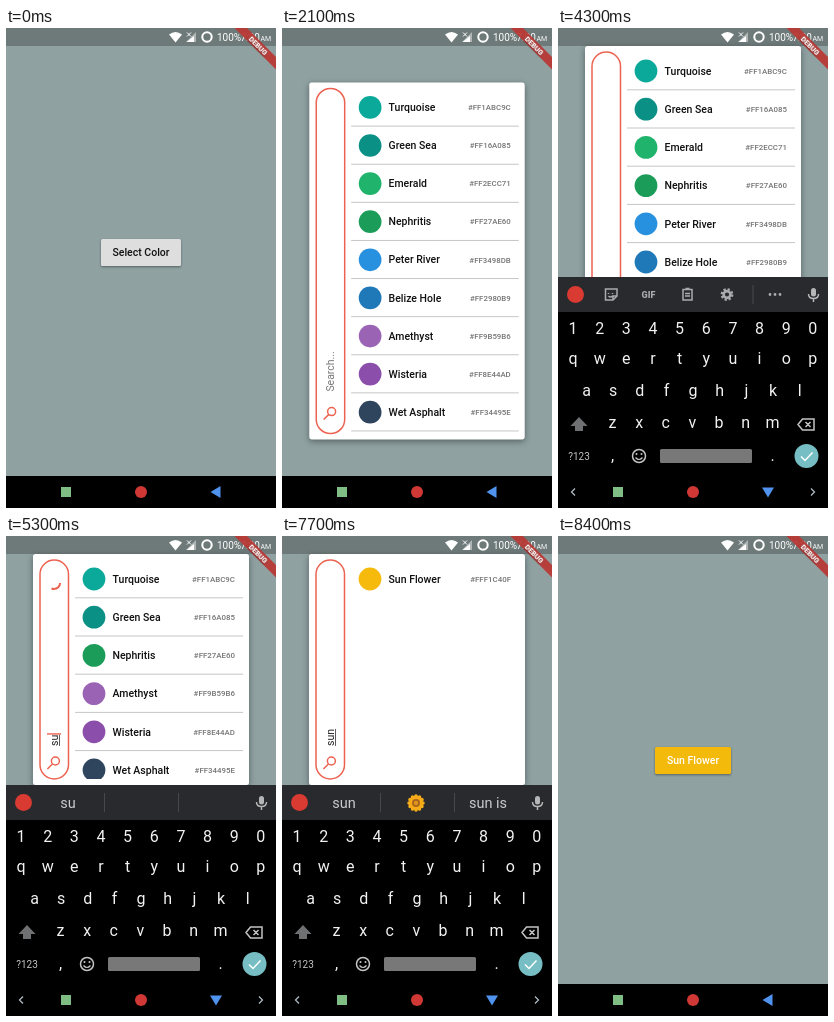
Recreate the animation shown at these times as an HTML page. Size 270x480 px, loop 9100 ms.

```html
<!DOCTYPE html>
<html lang="en">
<head>
<meta charset="utf-8">
<title>Color picker dialog</title>
<style>
  html, body { margin: 0; width: 100%; height: 100%; overflow: hidden; background: #000; }
  svg { display: block; width: 270px; height: 480px; font-family: Roboto, "Noto Sans", sans-serif; }
  .medium { font-weight: 500; }
  .raised { filter: drop-shadow(0 1px 1px rgba(0, 0, 0, .4)); }
  .panel { filter: drop-shadow(0 2px 3px rgba(0, 0, 0, .4)); }
  .line { fill: none; stroke-width: 1.5; }
</style>
</head>
<body>
<svg id="stage" viewBox="0 0 270 480">
  <defs>
    <clipPath id="listClip"><rect id="listBox" x="64" width="177"/></clipPath>
    <clipPath id="buttonClip"><rect x="95" y="-13.5" width="80" height="27" rx="1.5"/></clipPath>
  </defs>
  <rect width="270" height="480" fill="#8fa1a1"/>
  <g id="button"></g>
  <rect width="270" height="18" fill="#6e7a79"/>
  <g id="status" fill="#fff">
    <path d="M163 6.5Q169.5 1.5 176 6.5L169.5 14.5Z"/>
    <path d="M190 4V14H180Z" fill-opacity=".45"/>
    <path d="M188 8V14H180.5Z"/>
    <path d="M181 4.5l4 4m0-4l-4 4" stroke="#fff"/>
    <circle cx="201" cy="9" r="4.7" class="line" stroke="#fff" style="stroke-width:2"/>
    <text x="211" y="13" font-size="10">100%</text>
    <text x="234.5" y="13" font-size="10">7:00</text>
    <text x="254.5" y="13" font-size="7">AM</text>
  </g>
  <g id="dialog">
    <rect id="panel" class="panel" x="27" width="216" rx="2.5" fill="#fff"/>
    <g clip-path="url(#listClip)"><g id="list"></g></g>
    <g id="search"></g>
  </g>
  <g id="keyboard"></g>
  <g id="nav">
    <rect y="448" width="270" height="32"/>
    <rect x="55" y="459" width="10" height="10" fill="#80bd85"/>
    <circle cx="135" cy="464" r="6" fill="#cf3835"/>
    <path id="back" d="M204.5 464L214.5 458V470Z" fill="#4f93ee"/>
    <path id="arrows" d="M17 460.5L13.5 464L17 467.500M253 460.500L256.500 464L253 467.500" fill="none" stroke="#b4c0c8" stroke-width="1.2"/>
  </g>
  <g id="banner">
    <path d="M228.500 0H241L270 29V41.500Z" fill="#b93a37" fill-opacity=".94"/>
    <text class="raised" transform="translate(252.500 17.500) rotate(45)" y="2.600" font-size="7.200" font-weight="900" text-anchor="middle" fill="#fff">DEBUG</text>
  </g>
</svg>
<script>
const LOOP = 9100, STEP = 100;
const RED = '#ec6250';
const COLORS = [
  ['Turquoise', '#FF1ABC9C', '#0ba99a'],
  ['Green Sea', '#FF16A085', '#0a9085'],
  ['Emerald', '#FF2ECC71', '#1fb36b'],
  ['Nephritis', '#FF27AE60', '#1b9c59'],
  ['Peter River', '#FF3498DB', '#2790df'],
  ['Belize Hole', '#FF2980B9', '#1f79b9'],
  ['Amethyst', '#FF9B59B6', '#9b63b4'],
  ['Wisteria', '#FF8E44AD', '#8b4eaa'],
  ['Wet Asphalt', '#FF34495E', '#2f455d'],
  ['Midnight Blue', '#FF2C3E50', '#293b4d'],
  ['Sun Flower', '#FFF1C40F', '#f5ba0c']
];

const $ = id => document.getElementById(id);
const clamp = x => Math.max(0, Math.min(1, x));
const ramp = (t, start, end, from, to) => from + (to - from) * clamp((t - start) / (end - start));
const within = (t, start, end) => t >= start && t < end;
const set = (id, attrs) => Object.entries(attrs).forEach(([k, v]) => $(id).setAttribute(k, v));
const label = (x, y, size, text, extra = '') =>
  `<text x="${x}" y="${y}" font-size="${size}" ${extra}>${text}</text>`;
const centered = (x, y, size, text, extra = '') =>
  label(x, y, size, text, `text-anchor="middle" ${extra}`);

function elasticOut(p) {
  if (p <= 0) return 0;
  if (p >= 1) return 1;
  return 1 + 2 ** (-10 * p) * Math.sin((p - 0.1) * Math.PI * 5);
}

function dialogScale(t) {
  return t < 7400 ? elasticOut((t - 1374) / 1000) : elasticOut((8400 - t) / 1000);
}

const typed = t => 'sun'.slice(0, t < 4800 ? 0 : Math.min(3, 1 + Math.floor((t - 4800) / 400)));

function keyboardShift(t) {
  return t < 6000 ? ramp(t, 3900, 4100, 199, 0) : ramp(t, 8200, 8400, 0, 199);
}

function drawButton(t) {
  const picked = t >= 7400;
  const [text, fill, ink, width] = picked
    ? ['Sun Flower', '#f3b90b', '#fff', 76] : ['Select Color', '#dedede', '#111', 80];
  const ripple = within(t, 600, 900)
    ? `<circle cx="135" r="${ramp(t, 500, 800, 0, 45)}" fill-opacity=".12" clip-path="url(#buttonClip)"/>` : '';
  set('button', { transform: `translate(0 ${224.5 - (199 - keyboardShift(t)) / 2})` });
  $('button').innerHTML =
    `<rect class="raised" x="${135 - width / 2}" y="-13.5" width="${width}" height="27" rx="1.5" fill="${fill}"/>` +
    ripple + centered(135, 3.7, 10.5, text, `class="medium" fill="${ink}"`);
}

function drawList(t, top) {
  const query = typed(t - 300);
  const rows = COLORS.filter(([name]) => name.toLowerCase().includes(query));
  const press = within(t, 7300, 7600)
    ? `<rect x="69" y="${top + 6}" width="168" height="38" fill-opacity=".07"/>` : '';
  $('list').innerHTML = press + rows.map(([name, code, fill], i) => {
    const y = top + 25 + i * 38.2;
    const divider = i < rows.length - 1 ? `<path d="M69 ${y + 18.8}H237" stroke="#c6c6c6"/>` : '';
    return `<circle cx="88" cy="${y}" r="11.4" fill="${fill}"/>` +
      label(106.5, y + 3.7, 10.5, name, 'class="medium" fill="#111"') +
      label(229, y + 2.8, 7.9, code, 'class="medium" fill="#757575" text-anchor="end"') + divider;
  }).join('');
}

function drawSpinner(t, y) {
  const sweep = 190 + 85 * Math.cos((t - 6100) / 220);
  const turn = -40 + (t - 6100) * 0.4;
  return `<circle cx="48" cy="${y}" r="6" fill="none" stroke="${RED}" stroke-width="2" pathLength="360"
    stroke-dasharray="${sweep} 360" transform="rotate(${turn} 48 ${y})"/>`;
}

function drawSearch(t, top, bottom) {
  const start = top + 6, end = bottom - 6, length = end - start;
  const iconY = end - 9.1 - length * 0.0315;
  const textY = end - 17.5 - length * 0.071;
  const query = typed(t);
  const bar = `<rect class="line" x="34" y="${start}" width="28.5" height="${length}" rx="14.2" stroke="${RED}"/>`;
  const icon = `<g transform="translate(47 ${iconY})" class="line" stroke="${RED}">
    <circle cx="2.4" cy="-2" r="4"/><path d="M-.6 1L-5.6 6"/></g>`;
  const text = `<g transform="translate(52 ${textY}) rotate(-90)">` +
    label(0, 0, 10.5, query || 'Search...', `id="query" fill="${query ? '#222' : '#777'}"`) + '</g>';
  const touch = within(t, 2700, 2900)
    ? `<circle cx="49" cy="229" r="8.5" fill-opacity="${t < 2800 ? 0.14 : 0.08}"/>` : '';
  $('search').innerHTML = bar + icon + text + touch +
    (within(t, 5000, 6400) ? drawSpinner(t, top + 29) : '');
  if (!query) return;
  const tip = textY - $('query').getComputedTextLength();
  $('search').innerHTML += `<path d="M53.5 ${textY}V${tip}" stroke="#333" stroke-width=".8"/>` +
    (t < 6800 ? `<path d="M41 ${tip - 0.8}H55" stroke="${RED}" stroke-width="1.4"/>` : '');
}

function drawDialog(t) {
  const scale = dialogScale(t);
  $('dialog').style.display = scale > 0 ? '' : 'none';
  if (scale <= 0) return;
  const closing = t >= 8200;
  const top = closing ? ramp(t, 8200, 8400, 18, 54) : ramp(t, 4200, 4300, 54, 18);
  const bottom = closing ? ramp(t, 8200, 8400, 249, 412)
    : t <= 4300 ? ramp(t, 4200, 4300, 412, 376) : ramp(t, 4300, 4500, 376, 249);
  const cy = (top + bottom) / 2;
  set('dialog', { transform: `translate(135 ${cy}) scale(${scale}) translate(-135 ${-cy})` });
  set('panel', { y: top, height: bottom - top });
  set('listBox', { y: top + 6, height: bottom - top - 12 });
  drawList(t, top);
  drawSearch(t, top, bottom);
}

function buildKeyboard() {
  const row = (letters, x, y) => [...letters].map((c, i) => centered(x + i * 26.65, y, 16, c)).join('');
  const teeth = `<circle cx="169" cy="266.500" r="5.200" fill="none" stroke="#a9abad" stroke-width="2.400" stroke-dasharray="2.200 1.884"/>`;
  const petals = Array.from({ length: 12 }, (_, i) =>
    `<ellipse cx="134" cy="261.500" rx="2" ry="3.200" fill="#f5ac18" transform="rotate(${i * 30} 134 267)"/>`).join('');
  $('keyboard').innerHTML = `
    <rect y="249" width="270" height="199"/>
    <rect y="249" width="270" height="35" fill="#292a2d"/>
    <circle cx="17.500" cy="266.500" r="8.500" fill="#d93a32"/>
    <g id="tools" class="line" stroke="#a9abad">
      <path d="M47.500 261H59V268L55 272H47.500ZM55 272V268H59M50.500 265v1m4-1v1M50.500 268q2 2 4 0"/>
      ${centered(90.5, 270, 9, 'GIF', 'font-weight="900" fill="#a9abad" stroke="none"')}
      <path d="M125 261.500H134V272H125ZM127.500 260.500H131.500M127 265.500H132M127 268H132"/>
      ${teeth}<circle cx="169" cy="266.500" r="3.400" style="stroke-width:2.600"/>
      <path d="M195 257V276" stroke="#3d3f42"/>
      <path d="M212 266.500h.01m5 0h.01m5 0h.01" stroke-linecap="round" style="stroke-width:2.800"/>
    </g>
    <g id="hints" fill="#c9cbcd">
      <text id="word" x="62" y="271.500" font-size="14.500" text-anchor="middle"></text>
      <g id="more">${petals}<circle cx="134" cy="267" r="4" fill="#a8641b"/>
        <circle cx="134" cy="267" r="2.200" fill="#dd9420"/>
        ${centered(206, 271.5, 14.5, 'sun is')}</g>
      <path d="M98.500 257V276M172.500 257V276" stroke="#46484b"/>
    </g>
    <rect x="253" y="260" width="5" height="8.500" rx="2.500" fill="#b4b6b8"/>
    <path class="line" stroke="#b4b6b8" d="M250.500 266q0 4.500 5 4.500t5-4.500M255.500 270.500V274"/>
    <g fill="#f2f2f2">
      ${row('1234567890', 15, 305.5)}${row('qwertyuiop', 15, 336)}
      ${row('asdfghjkl', 28.5, 368)}${row('zxcvbnm', 54.5, 400)}
      ${centered(21, 431.5, 10, '?123', 'fill="#c4c4c4"')}
      ${centered(54.5, 433, 16, ',')}${centered(214.5, 433, 16, '.')}
    </g>
    <path d="M21 389L29.500 398H25V403H17V398H12.500Z" fill="#6e7072"/>
    <path class="line" stroke="#c4c4c4" d="M240 396.500L244.500 391H256V402H244.500ZM247.500 394l5 5m0-5l-5 5"/>
    <g class="line" stroke="#c4c4c4"><circle cx="81" cy="428" r="6.500"/>
      <path d="M78.500 426h.01m5 0h.01" stroke-linecap="round" style="stroke-width:2"/>
      <path d="M77.500 429.500q3.500 4 7 0" style="stroke-width:1.200"/></g>
    <rect x="102" y="421" width="92" height="14" rx="1.500" fill="#787878"/>
    <circle cx="248.500" cy="428" r="12" fill="#76bec3"/>
    <path class="line" stroke="#fff" d="M243 428.500l4 4 7.500-8"/>`;
}

function drawKeyboard(t) {
  const shift = keyboardShift(t);
  const query = typed(t);
  const show = (id, on) => { $(id).style.display = on ? '' : 'none'; };
  show('keyboard', shift < 199);
  set('keyboard', { transform: `translate(0 ${shift})` });
  show('tools', !query);
  show('hints', query);
  show('more', query === 'sun');
  $('word').textContent = query;
  show('arrows', within(t, 3400, 8400));
  set('back', { transform: `rotate(${t < 6000 ? ramp(t, 3900, 4200, 0, -90) : ramp(t, 8200, 8400, -90, 0)} 210 464)` });
}

function render(t) {
  drawButton(t);
  drawDialog(t);
  drawKeyboard(t);
}

let shown = -1;
function tick() {
  const t = Math.floor(performance.now() % LOOP / STEP) * STEP;
  if (t !== shown) render(shown = t);
  requestAnimationFrame(tick);
}

buildKeyboard();
tick();
</script>
</body>
</html>
```
